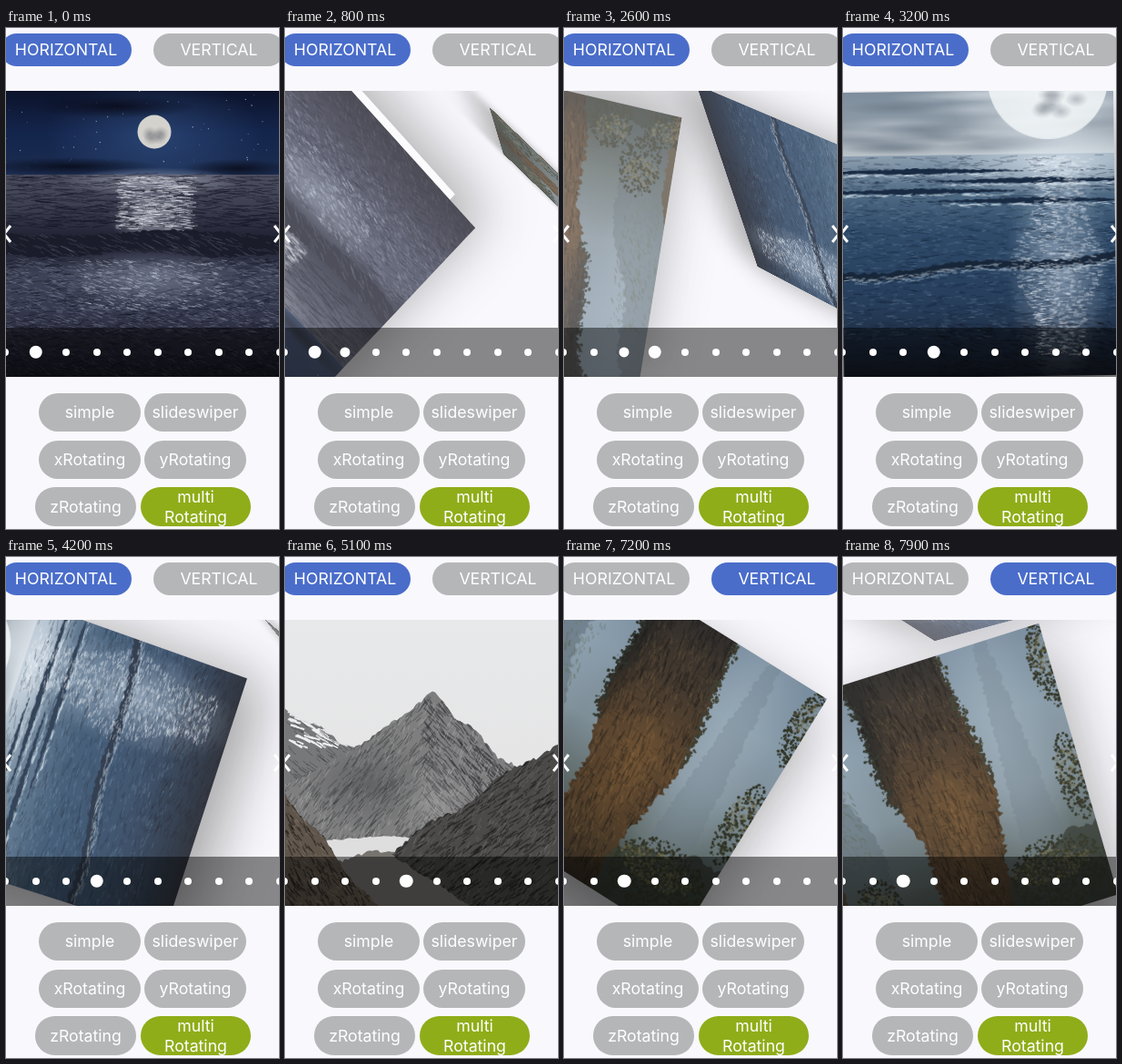
An HTML page with a canvas for the animation above (8000 ms loop, 300 by 550 pixels).

```html
<!DOCTYPE html>
<html lang="en">
<head>
<meta charset="utf-8">
<title>Slider</title>
<style>
html, body { margin: 0; width: 100%; height: 100%; overflow: hidden; background: #f9f8fc; }
#app { position: relative; width: 300px; height: 550px; overflow: hidden; font: 17.7px/21.5px Inter, sans-serif; color: #fff; }
.btn { position: absolute; display: flex; align-items: center; justify-content: center; text-align: center; border-radius: 22px; background: #b5b6b8; }
.green { background: #8fad19; }
#view { position: absolute; top: 69px; width: 300px; height: 313.5px; overflow: hidden; }
.slide { position: absolute; width: 300px; height: 314px; box-shadow: 0 25px 60px rgba(0,0,0,.38); }
.slide canvas { display: block; }
.strip { position: absolute; left: 45px; right: 0; top: 314px; height: 9px; background: #fcfcfd; }
#bar { position: absolute; z-index: 9; top: 260px; width: 300px; height: 54px; background: rgba(0,0,0,.46); }
.dot { position: absolute; top: 26.5px; border-radius: 50%; background: #fff; transform: translate(-50%, -50%); }
#arrows { position: absolute; z-index: 10; inset: 0; fill: none; stroke: #fff; stroke-width: 3; }
</style>
</head>
<body>
<div id="app">
  <div id="view">
    <div id="bar"></div>
    <svg id="arrows" width="300" height="314"><path d="M5 148L-2 157L5 166M295 148L302 157L295 166"/></svg>
  </div>
</div>
<script>
const W = 300, H = 314, LOOP = 8000, SWITCH = 5400;
const { sin, cos, PI, abs, min, max } = Math;
const app = document.getElementById('app');
const view = document.getElementById('view');
const bar = document.getElementById('bar');
const clamp = v => max(0, min(1, v));
const ease = k => (1 - cos(PI * clamp(k))) / 2;
const cubic = k => (k = clamp(k)) < .5 ? 4 * k ** 3 : 1 - 4 * (1 - k) ** 3;

function add(parent, cls) {
  const el = document.createElement('div');
  el.className = cls;
  parent.append(el);
  return el;
}

function button(text, x, y, w, h, cls = '') {
  const el = add(app, 'btn ' + cls);
  el.innerText = text;
  Object.assign(el.style, { left: x + 'px', top: y + 'px', width: w + 'px', height: h + 'px' });
  return el;
}

const horizontal = button('HORIZONTAL', -6, 6, 144, 35.5);
const vertical = button('VERTICAL', 162, 6, 144, 35.5);
['simple', 'slideswiper', 'xRotating', 'yRotating'].forEach((text, i) =>
  button(text, 36 + i % 2 * 116, i < 2 ? 400.5 : 452.5, 112, 42.5));
button('zRotating', 32, 504, 111, 43);
button('multi\nRotating', 148, 504, 121, 43, 'green');

const dots = Array.from({ length: 10 }, (_, i) => {
  const el = add(bar, 'dot');
  el.style.left = -1 + i * 33.5 + 'px';
  return el;
});

// Painting helpers
let seed = 7;
const rnd = () => (seed = seed * 16807 % 2147483647) / 2147483647;

function fade(g, y0, y1, ...colors) {
  const f = g.createLinearGradient(0, y0, 0, y1);
  colors.forEach((c, i) => f.addColorStop(i / (colors.length - 1), c));
  g.fillStyle = f;
  g.fillRect(0, y0, W, y1 - y0);
}

function glow(g, x, y, rx, ry, rgb, a) {
  g.save();
  g.translate(x, y);
  g.scale(rx, ry);
  const f = g.createRadialGradient(0, 0, 0, 0, 0, 1);
  f.addColorStop(0, `rgba(${rgb},${a})`);
  f.addColorStop(1, `rgba(${rgb},0)`);
  g.fillStyle = f;
  g.fillRect(-1, -1, 2, 2);
  g.restore();
}

function disc(g, x, y, r, color) {
  g.fillStyle = color;
  g.beginPath();
  g.arc(x, y, r, 0, 7);
  g.fill();
}

function dabs(g, n, x, y, w, h, color, len, slope = 0, thick = .8) {
  g.strokeStyle = color;
  g.lineWidth = thick;
  for (let i = 0; i < n; i++) {
    const px = x + rnd() * w, py = y + rnd() * h, l = len * (.4 + rnd()), a = slope + (rnd() - .5) * .4;
    g.beginPath();
    g.moveTo(px, py);
    g.lineTo(px + l * cos(a), py + l * sin(a));
    g.stroke();
  }
}

// Rough area between two curves over x, or over y when upright
function area(g, near, far, color, jag, inside, upright) {
  const edge = [];
  for (let s = -3; s <= H + 3; s += 3) {
    const a = near(s) + (rnd() - .5) * jag, b = max(a, far(s) + (rnd() - .5) * jag);
    edge.push([s, a]);
    edge.unshift([s, b]);
  }
  g.save();
  g.beginPath();
  edge.forEach(([s, v]) => upright ? g.lineTo(v, s) : g.lineTo(s, v));
  g.fillStyle = color;
  g.fill();
  g.clip();
  if (inside) inside();
  g.restore();
}
const floor = () => H + 9;

function leaves(g, x, y, w, h, color) {
  for (let i = 0; i < w * h / 3; i++) {
    const a = rnd() * 2 * PI, r = Math.sqrt(rnd());
    disc(g, x + cos(a) * r * w, y + sin(a) * r * h, .6 + rnd() * 1.3, color);
  }
}

function tree(g, x, y, w, h) {
  leaves(g, x, y, w, h, '#2a2d1f');
  leaves(g, x - w * .1, y - h * .2, w * .8, h * .45, 'rgba(112,106,68,.4)');
}

function nightOcean(g) {
  fade(g, 0, 93, '#0c132b', '#14254c', '#1c2d51');
  glow(g, 163, 50, 120, 65, '60,95,150', .5);
  for (let i = 0; i < 55; i++) disc(g, rnd() * W, rnd() * 85, .3 + rnd() * .4, 'rgba(210,225,255,.7)');
  glow(g, 120, 17, 90, 13, '9,12,28', .9);
  glow(g, 70, 83, 100, 10, '8,12,26', .9);
  glow(g, 255, 85, 60, 10, '10,13,28', .9);
  disc(g, 163, 45, 18.5, '#d4d2cd');
  for (let i = 0; i < 4; i++) glow(g, 155 + rnd() * 15, 38 + rnd() * 14, 9, 8, '120,122,128', .6);
  fade(g, 92, H, '#4c4f60', '#3b3e50', '#1c1e2e', '#3f4357', '#363a4e', '#272738', '#181825');
  glow(g, 163, 100, 100, 16, '200,205,218', .6);
  glow(g, 163, 138, 50, 34, '215,220,230', .6);
  dabs(g, 600, -10, 93, 310, 57, 'rgba(14,16,29,.45)', 18);
  dabs(g, 350, 120, 94, 80, 58, 'rgba(240,242,248,.5)', 9);
  area(g, x => 156 + 3 * sin(x / 40), x => 180 + 3 * sin(x / 30), '#1a1c2a', 3,
    () => dabs(g, 200, 0, 154, W, 32, 'rgba(115,120,140,.3)', 11, .4));
  dabs(g, 1100, -10, 184, 310, 80, 'rgba(165,172,194,.28)', 7, .25);
  dabs(g, 800, -10, 184, 310, 128, 'rgba(10,12,25,.45)', 10, -.15);
  glow(g, 160, 205, 100, 34, '190,200,222', .35);
  dabs(g, 250, 80, 185, 160, 55, 'rgba(230,235,245,.4)', 6, .2);
  dabs(g, 450, -5, 258, 305, 55, 'rgba(125,118,130,.23)', 6, .5);
}

function rockPillar(g) {
  const left = y => 70 + y * .172 + 5 * sin(y / 25);
  const right = y => 186 + 17 * sin(y / 300 * PI) ** 2;
  fade(g, 0, H, '#74899b', '#8296a4', '#7a8b95', '#55615f', '#252a22');
  glow(g, 225, 110, 60, 190, '165,182,196', .6);
  glow(g, 40, 90, 40, 150, '145,164,180', .5);
  area(g, y => -9, y => 18 + y * .22 + 6 * sin(y / 22), 'rgba(70,86,94,.4)', 5, null, true);
  area(g, y => 225 - y * .05, y => 240 + y * .1, 'rgba(92,110,122,.25)', 5, null, true);
  area(g, x => 300 - 95 * sin(x / 260) ** 2 + 5 * sin(x / 9), floor, 'rgba(40,46,37,.7)', 5);
  dabs(g, 350, 0, 60, 50, 200, 'rgba(88,96,76,.35)', 5, 1.1, 1.5);
  area(g, left, right, '#46382b', 7, () => {
    fade(g, 0, H, 'rgba(38,37,36,.9)', 'rgba(60,49,39,.7)', 'rgba(104,72,38,.5)', 'rgba(84,57,28,.5)', 'rgba(32,28,20,.8)');
    glow(g, 85, 70, 30, 130, '18,21,23', .7);
    glow(g, 155, 175, 32, 75, '150,104,52', .35);
    dabs(g, 700, 70, -10, 135, H, 'rgba(16,16,15,.35)', 13, 1.45, 1.2);
    dabs(g, 500, 95, 20, 110, 270, 'rgba(172,130,78,.25)', 7, 1.3);
    dabs(g, 250, 75, 20, 130, 270, 'rgba(24,22,18,.35)', 8, .15);
  }, true);
  for (let y = 4; y < 150; y += 9) {
    leaves(g, left(y), y, 3 + rnd() * 6, 6, '#282d25');
    leaves(g, right(y), y, 2 + rnd() * 5, 6, '#393a2c');
  }
  area(g, y => -9, y => min(9, (y - 185) / 4), '#4c4130', 4, null, true);
  tree(g, 42, 250, 26, 36);
  tree(g, 14, 300, 32, 28);
  tree(g, 85, 292, 26, 30);
  tree(g, 299, 42, 22, 50);
  tree(g, 290, 170, 19, 50);
  tree(g, 245, 268, 55, 42);
}

function moonSea(g) {
  fade(g, 0, 71, '#7d8d9c', '#8d9aa6', '#bcc4ca');
  for (let i = 0; i < 22; i++) glow(g, rnd() * W, 3 + rnd() * 60, 60, 8, i % 2 ? '92,106,122' : '196,204,212', .45);
  glow(g, 228, 0, 110, 80, '240,245,249', .8);
  disc(g, 228, -12, 66, 'rgba(246,249,251,.8)');
  for (let i = 0; i < 7; i++) glow(g, 222 + rnd() * 38, 5 + rnd() * 20, 13, 9, '130,138,148', .5);
  fade(g, 70, H, '#8c9fb0', '#4f6a84', '#2f4b69', '#294362', '#263d5a', '#1e2d43', '#151a25');
  glow(g, 238, 80, 130, 38, '230,239,247', .75);
  glow(g, 238, 195, 58, 130, '205,220,234', .55);
  dabs(g, 1100, -15, 72, 315, 230, 'rgba(10,22,42,.4)', 11);
  dabs(g, 900, -10, 72, 310, 200, 'rgba(150,178,202,.25)', 6);
  for (let i = 0; i < 4; i++) {
    const y = 88 + i * 11, mid = i % 2 ? 210 : 80;
    const body = x => 3.5 * max(0, 1 - abs(x - mid) / 130);
    area(g, x => y - body(x), x => y + body(x), '#182a42', 1.5);
    dabs(g, 60, mid - 100, y + 3, 200, 2, 'rgba(220,232,240,.6)', 9);
  }
  const swell = x => 203 - x * .06 + 3 * sin(x / 30);
  area(g, x => swell(x) - 5, x => swell(x) + 4, '#172539', 3);
  for (let x = 0; x < W; x += 5) dabs(g, 4, x, swell(x), 5, 7, 'rgba(185,202,216,.5)', 7, -.1);
  for (let y = 73; y < 290; y += 2) {
    const spread = 42 + 14 * sin(y / 24);
    dabs(g, 9, 240 - spread, y, spread * 1.8, 2, 'rgba(240,246,250,.55)', 5);
  }
  dabs(g, 350, 100, 255, 195, 58, 'rgba(15,16,23,.5)', 9, .2);
}

function grayPeaks(g) {
  fade(g, 0, H, '#e8e9ea', '#e5e5e6', '#d8d9da');
  area(g, x => 98 + x * .56 + 3 * sin(x / 8), floor, '#777879', 3, () => {
    dabs(g, 90, 0, 98, 75, 40, '#eeeeef', 13, .45, 2);
    dabs(g, 180, 0, 105, 90, 80, 'rgba(45,46,49,.5)', 9, .6);
  });
  const peak = x => x < 161 ? 80 + (161 - x) * (.82 - (161 - x) * .0012) : 80 + (x - 161) * .92 + 4 * sin(x / 7);
  area(g, peak, floor, '#7e7e7f', 4, () => {
    dabs(g, 600, 0, 82, 165, 165, 'rgba(48,49,51,.35)', 13, 2.25, 1.2);
    dabs(g, 650, 150, 85, 115, 165, 'rgba(45,46,49,.45)', 13, .85, 1.3);
    dabs(g, 700, 0, 85, 260, 155, 'rgba(200,200,199,.35)', 8, 2);
    glow(g, 92, 180, 75, 50, '57,58,60', .4);
    glow(g, 165, 200, 45, 45, '175,175,174', .45);
  });
  area(g, x => 237 + abs(x - 110) * .08, floor, '#dededf', 2);
  area(g, x => 262 + 8 * sin(x / 22), floor, '#77736f', 4);
  area(g, x => 133 + (300 - x) * .66 + 4 * sin(x / 14), x => x > 105 ? 250 + (x - 105) * .65 : 0, '#4b4a49', 4, () => {
    dabs(g, 800, 110, 135, 190, 180, 'rgba(25,25,26,.45)', 12, 2.5, 1.5);
    dabs(g, 600, 130, 140, 170, 170, 'rgba(140,138,135,.35)', 7, 2.1);
  });
  area(g, x => 190 + x * 1.25 + 4 * sin(x / 9), floor, '#5f554b', 4, () => {
    dabs(g, 350, 0, 190, 95, 123, 'rgba(29,26,23,.5)', 9, 1, 1.5);
    dabs(g, 350, 0, 190, 95, 123, 'rgba(165,150,130,.35)', 6, .8);
  });
}

const slides = [nightOcean, rockPillar, moonSea, grayPeaks].map((paint, i) => {
  const el = add(view, 'slide');
  const canvas = document.createElement('canvas');
  canvas.width = W;
  canvas.height = H;
  paint(canvas.getContext('2d'));
  el.append(canvas);
  el.style.zIndex = 5 - i;
  if (!i) add(el, 'strip');
  return el;
});

// Poses at distance d from the centre; turn is the spin after roll is undone
const poses = {
  horizontal: {
    leave: d => ({ x: -284 * d, y: -8 * d, roll: 90, tilt: 30 * d, turn: -270 * d }),
    enter: d => ({ x: 390 * d, y: -4 * d, roll: 44, tilt: -85 * min(1, 2 * d), turn: 264 * d })
  },
  vertical: {
    leave: d => ({ x: -34 * sin(12 * d), y: H * d, roll: -12, tilt: -115 * cubic(2 * d), turn: -200 * cubic(2 * d) }),
    enter: d => ({ x: -280 * (1 - d) * min(1, 4 * d), y: -265 * d, roll: 11, tilt: 80 * d, turn: 480 * d })
  }
};

// Swipes: start, duration, slides moved
const swipes = {
  horizontal: [[400, 640, .72], [1200, 600, .28], [1900, 1200, 1], [3100, 400, .02], [3800, 1200, .98]],
  vertical: [[6200, 1200, 1], [7300, 2460, 1]]
};

function mix(k) {
  const blue = [74, 109, 202], gray = [181, 182, 184];
  return `rgb(${gray.map((v, i) => v + (blue[i] - v) * k)})`;
}

function draw(t) {
  const mode = t < SWITCH ? 'horizontal' : 'vertical';
  const pos = swipes[mode].reduce((sum, [at, span, move]) => sum + move * ease((t - at) / span), 0);
  slides.forEach((el, i) => {
    const d = i - pos, far = abs(d);
    el.style.visibility = far < 1 ? 'visible' : 'hidden';
    if (far >= 1) return;
    const { x, y, roll, tilt, turn } = poses[mode][d > 0 ? 'enter' : 'leave'](far);
    el.style.transform = `translate(${x}px,${y}px) perspective(1200px) rotate(${roll}deg) rotateX(${tilt}deg) rotate(${turn - roll}deg)`;
    el.style.opacity = 1 - .45 * far;
  });
  dots.forEach((el, i) => {
    const d = pos + 1 - i;
    const k = d < 0 ? clamp((d + .55) / .1) : 1 - clamp((d - .55) / .15);
    el.style.width = el.style.height = 8 + 6.5 * k + 'px';
  });
  const k = clamp((t - SWITCH + 100) / 300);
  horizontal.style.background = mix(1 - k);
  vertical.style.background = mix(k);
}

const start = performance.now();
function tick() {
  const t = (performance.now() - start) % LOOP;
  draw(Math.floor(t / 100) * 100);
  requestAnimationFrame(tick);
}
tick();
</script>
</body>
</html>
```
